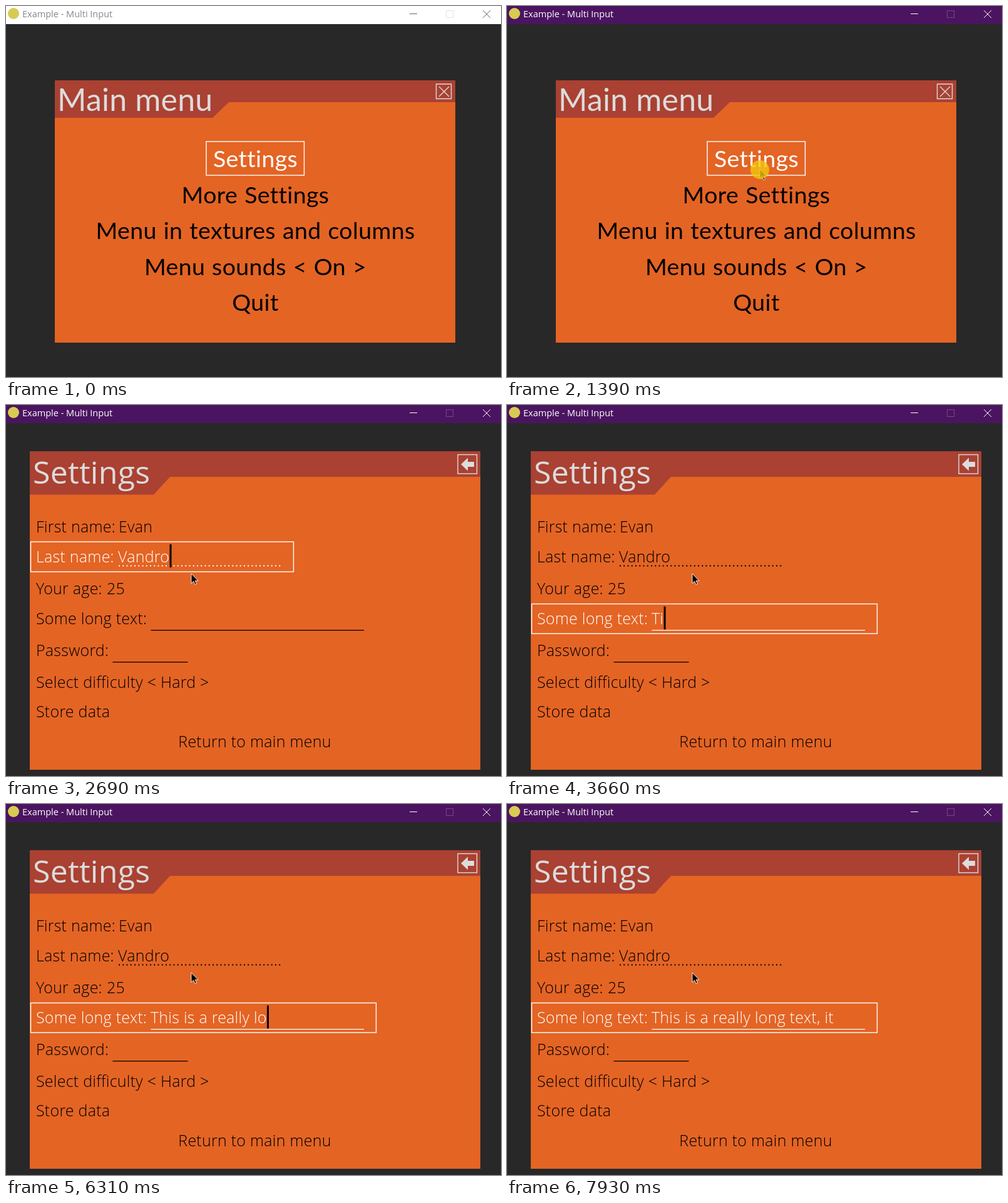
Write an HTML page that moves like this. It is 791 px wide and 594 px high and loops after 8000 ms.

```html
<!DOCTYPE html>
<html lang="en">
<head>
<meta charset="utf-8">
<title>Menu demo</title>
<style>
  html, body { margin: 0; width: 100%; height: 100%; overflow: hidden; background: #282828; }
  svg { display: block; }
  text { white-space: pre; }
  .bar { fill: #fff; }
  .caption { font: 14.5px "Open Sans", sans-serif; fill: #858590; }
  .icons { fill: none; stroke: #666; }
  .dim { stroke: #e4e4e4; }
  .focused .bar { fill: #4b1460; }
  .focused .caption { fill: #fff; }
  .focused .icons { stroke: #fff; }
  .focused .dim { stroke: #74497f; }
  .panel { fill: #e46424; }
  .head { fill: #aa4132; }
  .title { fill: #dcdcdc; letter-spacing: .2px; }
  .tool { fill: none; stroke: #dcdcdc; stroke-width: 1.4; }
  .frame { fill: none; stroke: #fff; stroke-width: 1.4; }
  #main text { font: 37.5px Lato, sans-serif; letter-spacing: .35px; word-spacing: 1px; text-anchor: middle; }
  #main .title { font-size: 50px; letter-spacing: .2px; word-spacing: 0; text-anchor: start; }
  #settings text { font: 300 25px "Open Sans", sans-serif; letter-spacing: .25px; }
  #settings .title { font: 50px "Open Sans", sans-serif; }
  .row { fill: #000; stroke: #000; }
  .row text { stroke: none; }
  .row.on { fill: #fff; stroke: #fff; }
  .row .frame, .row .caret { display: none; }
  .row.on .frame { display: inline; }
  .row.on .caret { display: inline; fill: #000; stroke: none; }
  .row.blink .caret { display: none; }
  .line { fill: none; stroke-width: 1.25; }
  .dots { fill: none; stroke-width: 2; stroke-dasharray: 2 4.25; }
</style>
</head>
<body>
<svg id="stage" width="791" height="594" viewBox="0 0 791 594">
  <rect width="791" height="594" fill="#282828"/>
  <rect class="bar" width="791" height="29"/>
  <circle cx="12" cy="12" r="9" fill="#d8cb52"/>
  <text class="caption" x="26" y="18">Example - Multi Input</text>
  <g class="icons">
    <path d="M645 12.5H657M762 7L774 19M774 7L762 19"/>
    <rect class="dim" x="703.5" y="7.5" width="11" height="11"/>
  </g>

  <g id="main">
    <rect class="panel" x="78" y="119" width="640" height="420"/>
    <path class="head" d="M78 119H718V154H356L330 179H78Z"/>
    <text class="title" x="82" y="168">Main menu</text>
    <path class="tool" d="M687.5 125H711.5V148.5H687.5ZM692 129L708 145M708 129L692 145"/>
    <rect class="frame" x="320" y="217" width="156.500" height="54"/>
    <text x="398.500" y="258" fill="#fff">Settings</text>
    <text x="398.500" y="316">More Settings</text>
    <text x="398.500" y="373">Menu in textures and columns</text>
    <text x="398.500" y="431">Menu sounds &lt; On &gt;</text>
    <text x="398.500" y="488">Quit</text>
  </g>

  <g id="settings">
    <rect class="panel" x="38" y="74" width="720" height="510"/>
    <path class="head" d="M38 74H758V115H262L236 143.500H38Z"/>
    <text class="title" x="43" y="126">Settings</text>
    <rect class="tool" x="722" y="79.500" width="30.500" height="30.500"/>
    <path fill="#dcdcdc" d="M727 95L738 84.500V91H748V99H738V105.500Z"/>
    <g class="row">
      <rect class="frame" x="39.500" y="172" width="203" height="44"/>
      <text x="48" y="204">First name: </text><text class="value" x="180" y="204">Evan</text>
      <rect class="caret" y="177" width="3" height="32"/>
    </g>
    <g class="row">
      <rect class="frame" x="39.500" y="219" width="420" height="48"/>
      <text x="48" y="252">Last name: </text><text class="value" x="179" y="252">Vandro</text>
      <path class="dots" d="M180 257.500H440"/>
      <rect class="caret" y="223" width="3" height="37"/>
    </g>
    <g class="row">
      <rect class="frame" x="39.500" y="271" width="159" height="44"/>
      <text x="48" y="303">Your age: </text><text class="value" x="161" y="303">25</text>
      <rect class="caret" y="276" width="3" height="32"/>
    </g>
    <g class="row">
      <rect class="frame" x="39.500" y="318.500" width="552" height="47.500"/>
      <text x="48" y="351">Some long text: </text><text class="value" x="231" y="351"></text>
      <path class="line" d="M231.500 360.500H572"/>
      <rect class="caret" y="322.500" width="3" height="37"/>
    </g>
    <g class="row">
      <text x="48" y="402">Password: </text>
      <path class="line" d="M170.500 411.500H290.500"/>
    </g>
    <text x="48" y="453">Select difficulty &lt; Hard &gt;</text>
    <text x="48" y="500">Store data</text>
    <text x="397.500" y="548" text-anchor="middle">Return to main menu</text>
  </g>

  <path id="pointer" d="M0 0V15.500L3.700 12.200 6 17.500 8.500 16.500 6.200 11.300H11Z" stroke="#fff" stroke-width=".9"/>
  <circle id="click" cx="404" cy="262" r="15" fill="#f2c40c"/>
</svg>
<script>
  const LOOP = 8000;
  const $ = id => document.getElementById(id);
  const stage = $("stage"), pointer = $("pointer"), click = $("click");
  const rows = [...document.querySelectorAll(".row")].slice(0, 4);
  const carets = rows.map(r => r.querySelector(".caret"));
  const values = rows.map(r => r.querySelector(".value"));

  const phrase = "This is a really long text, it";
  const keyTimes = [3270, 4020, 4520, 4580, 4640, 5010, 5080, 5200, 5260, 5380,
    5440, 5500, 5570, 5700, 5820, 5940, 6000, 6120, 6310, 6430,
    6490, 6560, 6620, 6740, 6990, 7180, 7490, 7680, 7740, 7860];
  const typo = { from: 3660, to: 3900 };
  const presses = [...keyTimes, typo.from, typo.to];
  const caretOff = [3470, 3960, 4460, 4950, 6930, 7430, 7930];
  const moves = [2690, 2820, 2940];

  const show = (el, on) => { el.style.display = on ? "" : "none"; };
  const count = (list, t) => list.filter(x => x <= t).length;
  const latest = (list, t) => Math.max(0, ...list.filter(x => x <= t));
  // Share of a stepped move done at time t
  const stepped = (t, start, gap, steps) =>
    Math.max(0, Math.min(steps, Math.floor((t - start) / gap) + 1)) / steps;
  const bezier = (a, b, c, u) => (1 - u) ** 2 * a + 2 * u * (1 - u) * b + u * u * c;

  function pointerAt(t) {
    if (t < 1950) {
      const u = 1 - (1 - stepped(t, 180, 66, 11)) ** 2;
      return [bezier(800, 540, 404, u), bezier(165, 165, 261, u)];
    }
    const u = stepped(t, 1950, 60, 4);
    return [404 - 108 * u, 261 + 9 * u];
  }

  function draw(t) {
    stage.classList.toggle("focused", t >= 180);
    show($("main"), t < 1520);
    show($("settings"), t >= 1520);
    show(pointer, t >= 180);
    pointer.setAttribute("transform", `translate(${pointerAt(t)})`);
    show(click, t >= 1270 && t < 1520);
    click.setAttribute("opacity", 0.4 + 0.4 * stepped(t, 1270, 60, 3));
    if (t < 1520) return;

    const mistyped = t >= typo.from && t < typo.to;
    values[3].textContent = phrase.slice(0, count(keyTimes, t)) + (mistyped ? "i" : "");
    const selected = count(moves, t);
    rows.forEach((row, i) => {
      row.classList.toggle("on", i === selected);
      const text = values[i];
      const width = text.textContent ? text.getComputedTextLength() : 0;
      carets[i].setAttribute("x", +text.getAttribute("x") + width + 0.3);
    });
    rows[3].classList.toggle("blink", latest(caretOff, t) > latest(presses, t));
  }

  const begin = performance.now();
  function tick() {
    draw((performance.now() - begin) % LOOP);
    requestAnimationFrame(tick);
  }
  draw(0);
  requestAnimationFrame(tick);
</script>
</body>
</html>
```
